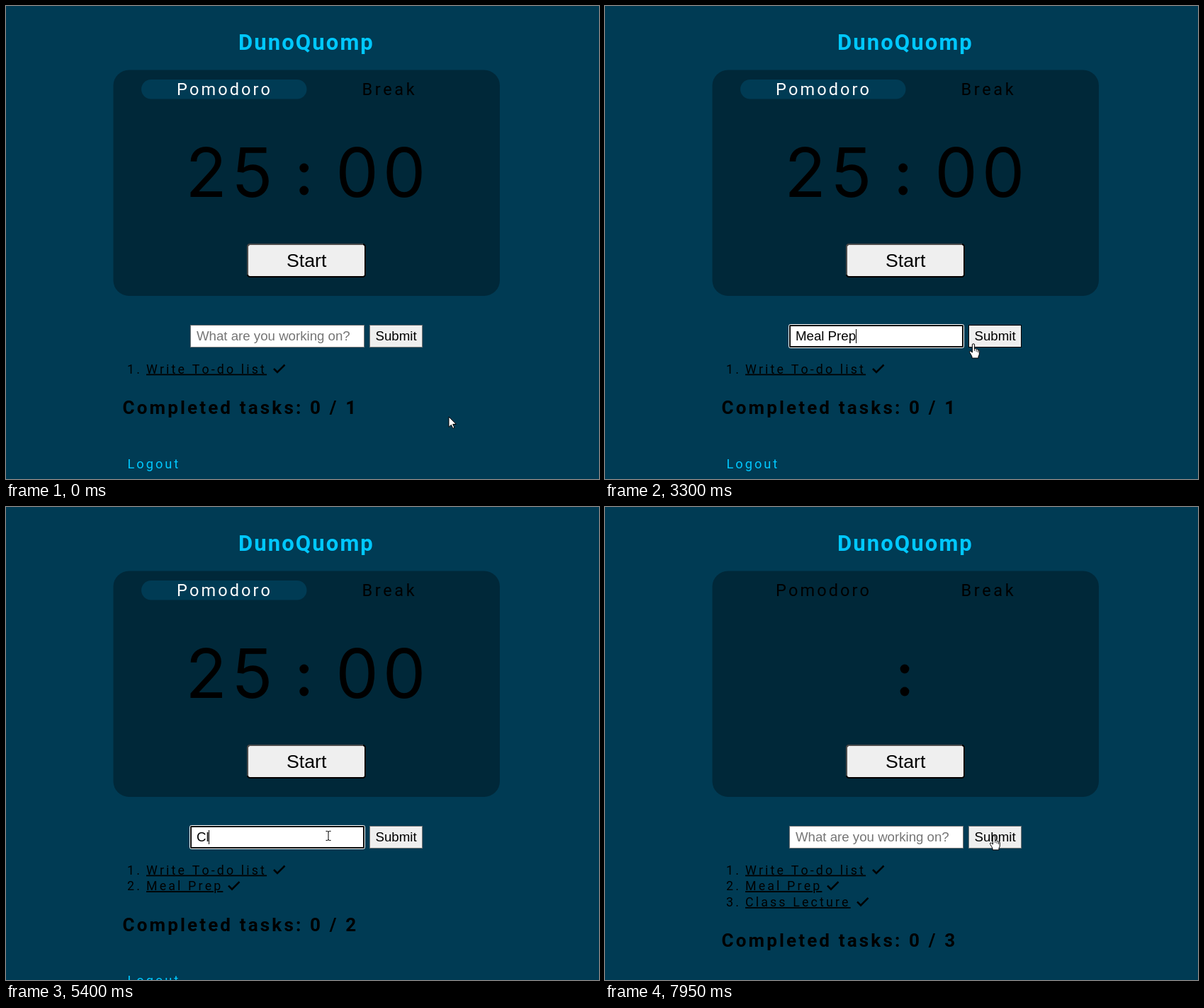
An HTML page for the animation above (8 s loop, 837 by 669 pixels).

```html
<!DOCTYPE html>
<html lang="en">
<head>
<meta charset="utf-8">
<title>Pomodoro timer</title>
<style>
  html, body { margin: 0; width: 100%; height: 100%; overflow: hidden; background: #003b54; }
  svg { display: block; }
  text { font-family: Roboto, sans-serif; font-kerning: none; white-space: pre; }
  .accent { fill: #00c8ff; }
  .title { font-size: 31px; font-weight: 600; letter-spacing: 2.1px; }
  .tab { font-size: 23.5px; letter-spacing: 3.1px; }
  .clock { font: 96px Inter, sans-serif; text-anchor: middle; }
  .ui { font: 18.67px "Liberation Sans", Arial, sans-serif; }
  .start { font-size: 26.67px; }
  .item { font-size: 17.8px; letter-spacing: 3.15px; }
  .task { text-decoration: underline; }
  .total { font-size: 26px; font-weight: 600; letter-spacing: 3.15px; }
  .link { font-size: 18.2px; letter-spacing: 3px; }
  .check { fill: none; stroke: #000; stroke-width: 2.5; }
  .pointer { fill: #fff; stroke: #000; stroke-linejoin: round; }
</style>
</head>
<body>
<svg width="837" height="669" viewBox="0 0 837 669">
  <text class="title accent" x="328" y="62">DunoQuomp</text>

  <rect x="151.5" y="90.5" width="545.5" height="319.5" rx="22" fill="#002839"/>
  <rect id="pill" x="191" y="104" width="233.5" height="27.5" rx="13.75" fill="#003b54"/>
  <text id="tab" class="tab" x="241" y="126">Pomodoro</text>
  <text class="tab" x="502.5" y="126" style="letter-spacing:3.6px">Break</text>

  <g id="digits">
    <text class="clock" x="282.5 348" y="269.5">25</text>
    <text class="clock" x="495.5 562" y="269.5">00</text>
  </g>
  <g id="colon">
    <circle cx="420.7" cy="229" r="6.4"/>
    <circle cx="420.7" cy="261" r="6.4"/>
  </g>

  <rect x="341" y="337" width="166" height="46" rx="3.5" fill="#efefef" stroke="#000" stroke-width="2"/>
  <path d="M341 380V340.5q0-3.5 3.5-3.5H504" fill="none" stroke="#4c4c4c" stroke-width="2"/>
  <text class="ui start" x="396" y="369">Start</text>

  <rect x="260.5" y="451.5" width="245" height="31" fill="#fff" stroke="#767676"/>
  <g id="ring" fill="none">
    <rect x="259.5" y="450.5" width="247" height="33" rx="2" stroke="#fff"/>
    <rect x="261" y="452" width="244" height="30" rx="1" stroke="#101010" stroke-width="2"/>
  </g>
  <text id="entry" class="ui" x="269" y="473"></text>
  <rect id="caret" y="457" width="1" height="20"/>

  <rect id="submit" x="513.5" y="451.5" width="74" height="31" fill="#efefef"/>
  <text class="ui" x="521.5" y="473">Submit</text>

  <g id="list"></g>
  <g id="footer">
    <text id="total" class="total" x="164.5" y="577"></text>
    <text class="link accent" x="171.5" y="653.5">Logout</text>
  </g>

  <path id="arrow" class="pointer" d="M0 0V14.5L3.4 11.4L5.8 16.4L8 15.4L5.7 10.5H10.3Z"/>
  <path id="beam" fill="none" stroke="#000" d="M-3.5-6.5H-1.5Q0-6.5 0-5.2Q0-6.5 1.5-6.5H3.5M0-5.5V5.5M-3.5 6.5H-1.5Q0 6.5 0 5.2Q0 6.5 1.5 6.5H3.5"/>
  <g id="hand">
    <path class="pointer" d="M-1.6 1Q-1.6-.2 0-.2T1.6 1V7Q3.6 5.8 4.2 7.6Q6 6.8 6.5 8.6Q8.3 8 8.3 10V14Q8.3 16 7 17.5V20H-2V18Q-2.8 16-5 12.5Q-6 10.5-5 10T-1.6 12Z"/>
    <path d="M1.6 7V10M4.2 8V11M6.5 9V12" fill="none" stroke="#000" stroke-width=".8"/>
  </g>
</svg>
<script>
const LOOP = 8000, ROW = 22.7;
const $ = id => document.getElementById(id);
const show = (id, on) => $(id).setAttribute('visibility', on ? 'visible' : 'hidden');
const shift = (id, x, y) => $(id).setAttribute('transform', `translate(${x} ${y})`);

// name, time added, end of underline
const tasks = [
  ['Write To-do list', 0, 369],
  ['Meal Prep', 3900, 305],
  ['Class Lecture', 7950, 347]
];

// focus, blur, clear, text, time of each key
const entries = [
  { focus: 1050, blur: 3600, clear: 3900, text: 'Meal Prep',
    keys: [1750, 1900, 2000, 2050, 2150, 2200, 2300, 2350, 2450] },
  { focus: 4600, blur: 7600, clear: 7950, text: 'Class Lecture',
    keys: [5250, 5400, 5500, 5600, 5750, 5850, 6050, 6150, 6200, 6350, 6450, 6500, 6600] }
];

// time, x, y
const path = [
  [450, 625, 581], [1050, 477, 478], [3200, 477, 478], [3300, 520, 478],
  [3600, 545, 467], [4000, 545, 467], [4400, 455, 465],
  [7050, 455, 465], [7600, 549, 465]
];

$('list').innerHTML = tasks.map(([name, , end], i) => `
  <g id="task${i}" transform="translate(0 ${i * ROW})">
    <text class="item" x="171" y="519.5">${i + 1}.</text>
    <text class="item task" x="198" y="519.5">${name}</text>
    <path class="check" d="M${end + 9} 513l5 5l10.5-10.5"/>
  </g>`).join('');

function pointerAt(t) {
  const i = path.findIndex(p => p[0] > t);
  if (i === 0) return path[0].slice(1);
  if (i < 0) return path[path.length - 1].slice(1);
  const [t0, x0, y0] = path[i - 1], [t1, x1, y1] = path[i];
  const u = (t - t0) / (t1 - t0), k = u * u * (3 - 2 * u);
  return [x0 + (x1 - x0) * k, y0 + (y1 - y0) * k];
}

function drawPointer(t) {
  const [x, y] = pointerAt(Math.floor(t / 50) * 50);
  const inRow = y > 450 && y < 484;
  const kind = inRow && x > 259 && x < 507 ? 'beam'
    : inRow && x > 512 && x < 589 ? 'hand' : 'arrow';
  for (const id of ['arrow', 'beam', 'hand']) show(id, id === kind);
  shift(kind, Math.round(x), Math.round(y));
  return kind;
}

function drawEntry(t) {
  const e = entries.find(e => t >= e.focus && t < e.clear);
  const typed = e ? e.keys.filter(k => k <= t).length : 0;
  const focused = !!e && t < e.blur;
  const el = $('entry');
  el.textContent = typed ? e.text.slice(0, typed) : 'What are you working on?';
  el.setAttribute('fill', typed ? '#000' : '#757575');
  show('ring', focused);
  const since = focused ? t - (typed ? e.keys[typed - 1] : e.focus) : 0;
  show('caret', focused && since % 800 < 400);
  $('caret').setAttribute('x', typed ? Math.floor(269 + el.getComputedTextLength()) : 269);
  return focused;
}

function draw(t) {
  const count = tasks.filter(task => task[1] <= t).length;
  tasks.forEach((_, i) => show('task' + i, i < count));
  $('total').textContent = `Completed tasks: 0 / ${count}`;
  shift('footer', 0, (count - 1) * ROW);

  const reset = t >= 7950;
  const reload = reset || (t >= 3900 && t < 4000);
  show('pill', !reload);
  $('tab').setAttribute('fill', reload ? '#000' : '#fff');
  show('digits', !reset);
  shift('colon', reset ? 2.3 : 0, 0);

  const focused = drawEntry(t);
  const hover = drawPointer(t) === 'hand' && focused;
  $('submit').setAttribute('stroke', hover ? '#000' : '#767676');
}

const begin = performance.now();
function tick() {
  draw((performance.now() - begin) % LOOP);
  requestAnimationFrame(tick);
}
tick();
</script>
</body>
</html>
```
